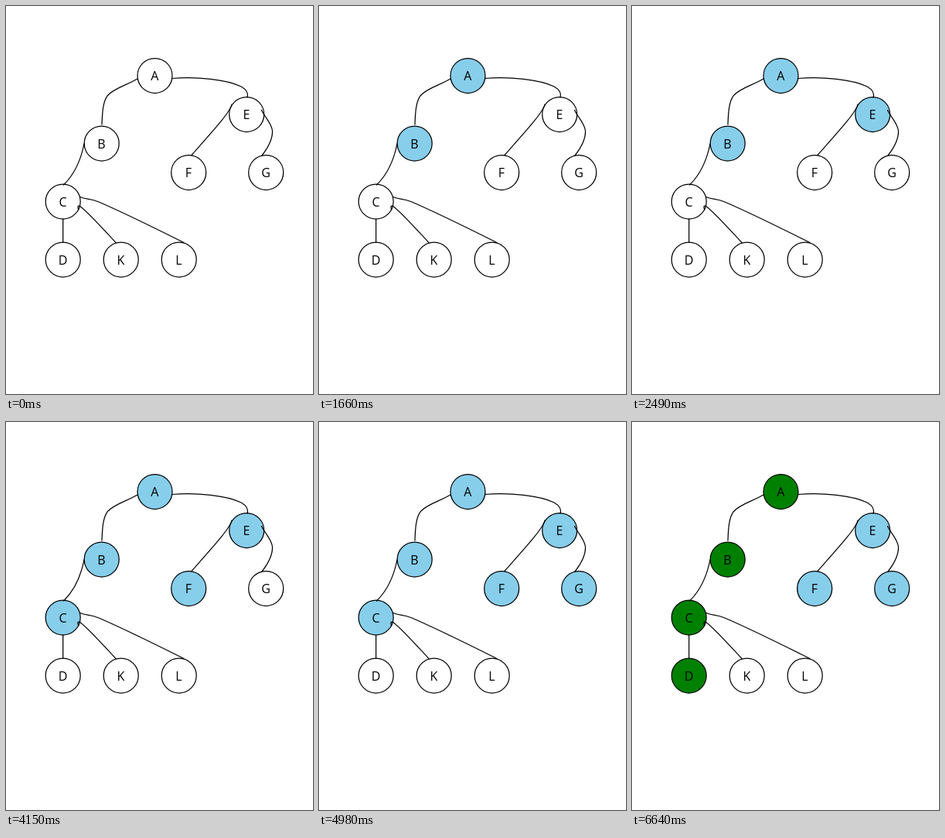
These frames come from a looping animation (397x501 px, 7.47 s). An HTML page:

```html
<!DOCTYPE html>
<html lang="en">
<head>
<meta charset="utf-8">
<title>Breadth-first search</title>
<style>
  html, body { margin: 0; width: 100%; height: 100%; overflow: hidden; background: #fff; }
  svg { display: block; }
  circle { fill: #fff; stroke: #000; stroke-width: 1.25; }
  path { fill: none; stroke: #000; stroke-width: 1.25; stroke-linecap: round; }
  text { font: 16px "Open Sans", "Noto Sans", sans-serif; text-anchor: middle; fill: #000; }
</style>
</head>
<body>
<svg id="tree" width="397" height="501" viewBox="0 0 397 501">
  <g id="nodes"></g>
  <g id="edges">
    <path d="M170 94C157 102 139 106 131 116C125 124 124.500 140 124 153"/>
    <path d="M215 93.500C247 91 285 95 304 104C311 108 314 112 312 118"/>
    <path d="M101 178C98 193 91 215 74.500 231"/>
    <path d="M292 127C290 137 268 161 240 192.500"/>
    <path d="M330.500 134.500C334 143 343 150 344.500 161C345 172 338 184 331 193"/>
    <path d="M73.700 275V305"/>
    <path d="M94 263C92 260 93 257 95.500 258.500C104 264 121 283 142 305.500"/>
    <path d="M96 246.500C103 250 109 248 120 253C155 268 195 288 230 305.500"/>
  </g>
  <g id="labels"></g>
</svg>
<script>
  const STEP = 830, STEPS = 9, RADIUS = 22.5;
  const IDLE = "#ffffff", VISITED = "#87ceeb", FOUND = "#008000";

  // label, x, y, step of the visit, step at which the found path lights up
  const nodes = [
    ["A", 192.5, 90, 1, 8],
    ["B", 123.7, 177.5, 2, 8],
    ["E", 311.2, 140, 3],
    ["C", 73.7, 252.5, 4, 8],
    ["F", 236.2, 215, 5],
    ["G", 336.2, 215, 6],
    ["D", 73.7, 327.5, 7, 8],
    ["K", 148.7, 327.5],
    ["L", 223.7, 327.5]
  ];

  function add(parentId, tag, attributes) {
    const element = document.createElementNS("http://www.w3.org/2000/svg", tag);
    for (const [name, value] of Object.entries(attributes)) element.setAttribute(name, value);
    return document.getElementById(parentId).appendChild(element);
  }

  function holdFills(circle, visit, found) {
    const frame = (fill, step) => ({ fill, offset: step / STEPS, easing: "steps(1, end)" });
    const frames = [frame(IDLE, 0), frame(VISITED, visit)];
    if (found) frames.push(frame(FOUND, found));
    frames.push(frame(found ? FOUND : VISITED, STEPS));
    circle.animate(frames, { duration: STEP * STEPS, iterations: Infinity });
  }

  for (const [label, x, y, visit, found] of nodes) {
    const circle = add("nodes", "circle", { cx: x, cy: y, r: RADIUS });
    add("labels", "text", { x: x - 0.2, y: y + 6 }).textContent = label;
    if (visit) holdFills(circle, visit, found);
  }
</script>
</body>
</html>
```
